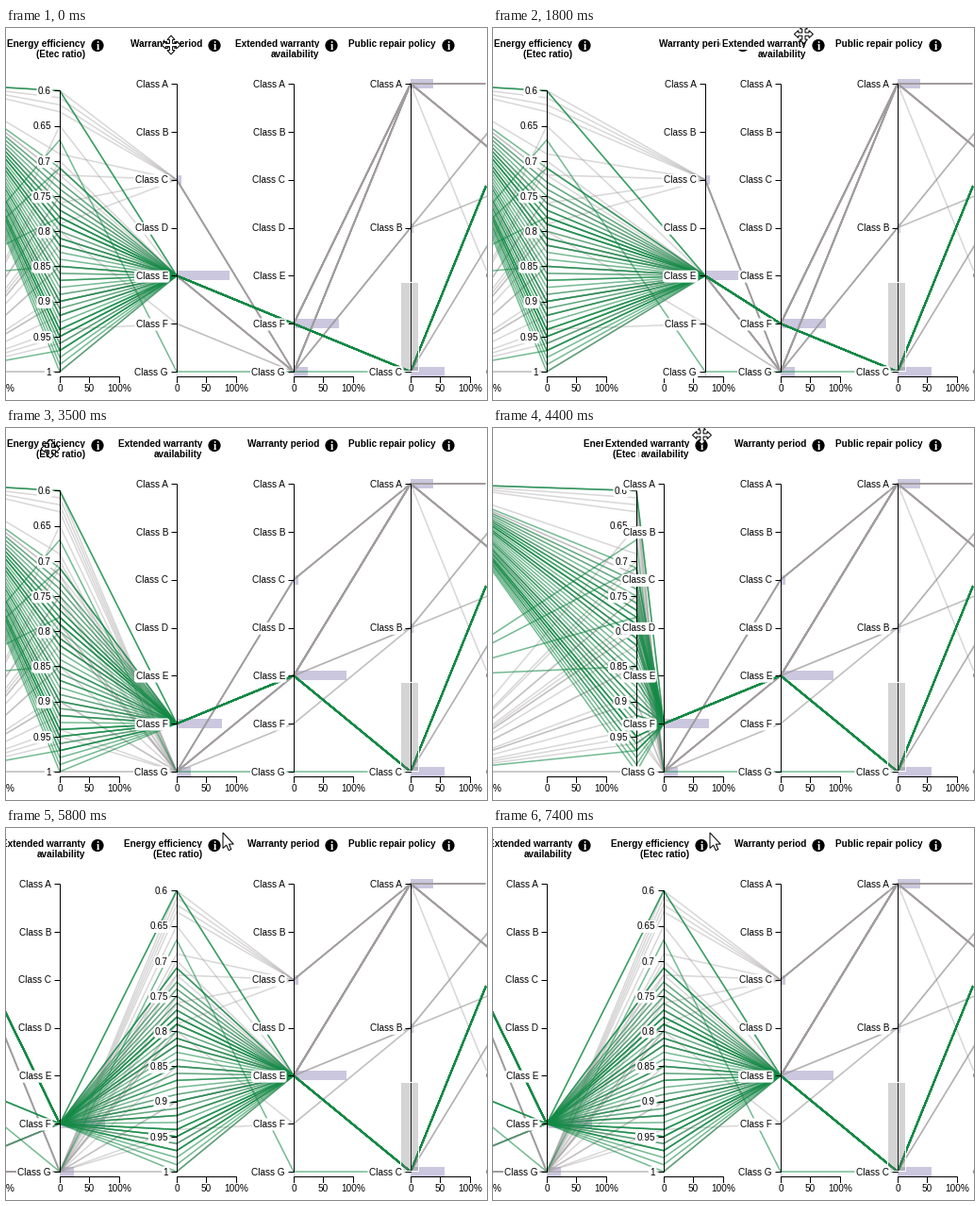
Animation of 510 by 394 pixels, one loop 7.5 s. Source, as a matplotlib script:

```python
import random

import matplotlib.pyplot as plt
import numpy as np
from matplotlib.animation import FuncAnimation
from matplotlib.collections import LineCollection
from matplotlib.patches import Circle, Polygon, Rectangle
from matplotlib.transforms import Affine2D

W, H, DPI = 510, 394, 64
PX = 72 / DPI
FRAMES, STEP = 75, 100
TOP, BOTTOM, BASE = 59, 364, 369
SLOTS = [-67 + 124 * i for i in range(6)]
GREEN, GRAY, BAR = (0.07, 0.54, 0.27), (0.63, 0.61, 0.62), (0.795, 0.78, 0.87)
LETTERS = "ABCDEFG"
CLASSES = dict(left=7, warranty=7, extended=7, repair=3, after=4)

plt.rcParams["font.family"] = "Liberation Sans"
plt.rcParams["font.size"] = 10 * PX

fig = plt.figure(figsize=(W / DPI, H / DPI), dpi=DPI, facecolor="white")
ax = fig.add_axes([0, 0, 1, 1])
ax.set_xlim(0, W)
ax.set_ylim(H, 0)
ax.axis("off")


def level(letter, count):
    return TOP + (BOTTOM - TOP) * LETTERS.index(letter) / (count - 1)


def ratio(v):
    return TOP + (BOTTOM - TOP) * (v - 0.59) / 0.41


def fan(path, low, high, count):
    """Records sharing one class path, spread evenly over the ratio axis."""
    shared = {d: level(c, n) for c, (d, n) in zip(path, CLASSES.items())}
    return [dict(shared, energy=ratio(round(v, 2)))
            for v in np.linspace(low, high, count)]


def scatter(path, low, high, count):
    return [r for _ in range(count) for r in fan(path, rng.uniform(low, high), high, 1)]


rng = random.Random(4)
gray = (fan("ACGAA", 0.6, 0.63, 4) + fan("ACGAB", 0.69, 0.79, 4)
        + fan("GEGAA", 0.65, 1, 8) + fan("GEGBA", 0.79, 1, 3)
        + fan("GEFAA", 0.71, 0.96, 8) + scatter("AEFAB", 0.7, 0.98, 10)
        + fan("AEFCB", 0.82, 0.9, 3) + fan("GFGBB", 0.8, 0.94, 2)
        + fan("AEFAD", 0.9, 0.9, 1))
green = (fan("AEFCA", 0.73, 1, 28) + scatter("AEFCA", 0.74, 0.99, 14)
         + fan("AEFCA", 0.6, 0.6, 2) + fan("AEFCA", 0.71, 0.71, 1)
         + fan("EEFCA", 0.71, 0.85, 3) + fan("GEFCA", 0.97, 0.97, 1)
         + fan("EGGCA", 0.67, 0.67, 1))
records = gray + green
threads = LineCollection(
    [], linewidths=1.55 * PX, zorder=1, snap=False,
    colors=[(*GRAY, 0.4)] * len(gray) + [(*GREEN, 0.58)] * len(green))
ax.add_collection(threads, autolim=False)


class Dimension:
    """A vertical axis with its title, ticks and bars, movable as one group."""

    def __init__(self, name, slot, ticks, *title):
        self.z = 10 + slot
        self.shift = Affine2D()
        self.tr = self.shift + ax.transData
        self.move(SLOTS[slot])
        if name in CLASSES:
            for y in ticks.values():
                share = np.mean([r[name] == y for r in records])
                self.add(Rectangle((0, y - 5), 63 * share, 10, fc=BAR, lw=0), 0.5)
        top, bottom = min(ticks.values()), max(ticks.values())
        paths = [[(0, top), (0, bottom)]]
        paths += [[(-6, y), (0, y)] for y in ticks.values()]
        lines = LineCollection(paths, colors="black", linewidths=PX,
                               transform=self.tr, zorder=self.z + 0.1)
        ax.add_collection(lines, autolim=False)
        for label, y in ticks.items():
            self.text(-9, y + 3.8, label)
        for i, line in enumerate(title):
            self.text(27, 19.5 + 11 * i, line, weight="bold")
        if title:
            self.add(Circle((40, 18.5), 6.6, fc="black", lw=0), self.z + 0.5)
            ax.text(40, 22.6, "i", ha="center", color="white", weight="bold",
                    family="Liberation Serif", size=12 * PX,
                    transform=self.tr, zorder=self.z + 0.6, clip_on=True)

    def add(self, patch, z):
        patch.set_transform(self.tr)
        patch.set_zorder(z)
        ax.add_artist(patch)

    def text(self, x, y, s, **style):
        halo = dict(boxstyle="round,pad=0.15,rounding_size=0.3", fc="white", lw=0)
        ax.text(x, y, s, ha="right", va="baseline", transform=self.tr,
                zorder=self.z + 0.4, bbox=halo, **style)

    def move(self, x):
        self.x = x
        self.shift.clear().translate(x, 0)


def class_ticks(name):
    n = CLASSES[name]
    return {f"Class {c}": level(c, n) for c in LETTERS[:n]}


def percent_scale(x):
    ax.plot([x, x, x + 63, x + 63], [BASE + 6, BASE, BASE, BASE + 6], "k", lw=PX, zorder=5)
    ax.plot([x + 31.4] * 2, [BASE, BASE + 6], "k", lw=PX, zorder=5)
    for part, label in ((0, "0"), (0.5, "50"), (1, "100%")):
        ax.text(x + 63 * part, BASE + 16.2, label, ha="center", va="baseline",
                zorder=5, clip_on=True)


for slot in SLOTS:
    percent_scale(slot)

ratios = {f"{v:g}": ratio(v) for v in np.round(np.arange(0.6, 1.01, 0.05), 2)}
dims = {
    "left": Dimension("left", 0, class_ticks("left")),
    "energy": Dimension("energy", 1, ratios, "Energy efficiency", "(Etec ratio)"),
    "warranty": Dimension("warranty", 2, class_ticks("warranty"), "Warranty period"),
    "extended": Dimension("extended", 3, class_ticks("extended"),
                          "Extended warranty", "availability"),
    "repair": Dimension("repair", 4, class_ticks("repair"), "Public repair policy"),
    "after": Dimension("after", 5, class_ticks("after")),
}
brush = dict(xy=(-11, 269), width=19, height=94)
dims["repair"].add(Rectangle(**brush, fc="#777777", alpha=0.31, lw=0), 14.2)
dims["repair"].add(Rectangle(**brush, fill=False, ec="white", lw=PX), 14.3)


def cursor(points):
    place = Affine2D()
    shape = Polygon(points, fc="white", ec="black", lw=PX, joinstyle="miter",
                    transform=place + ax.transData, zorder=30)
    ax.add_artist(shape)
    return shape, place


quarter = np.array([(-1.6, -1.6), (-1.6, -5.6), (-4, -5.6),
                    (0, -10), (4, -5.6), (1.6, -5.6)])
cross = np.vstack([Affine2D().rotate_deg(90 * k).transform(quarter) for k in range(4)])
arrow = [(-4, -9.5), (-4, 7), (-0.3, 3.6), (2.2, 9.2), (4.8, 8.1), (2.4, 2.6), (7.3, 2.6)]
hand, hand_place = cursor(cross)
pointer, pointer_place = cursor(arrow)


def glide(t, value, *moves):
    """Ease through moves given as (begin, end, goal)."""
    for begin, end, goal in moves:
        s = min(max((t - begin) / (end - begin), 0), 1)
        value += (goal - value) * s * s * (3 - 2 * s)
    return value


def draw(n):
    t = n * STEP / 1000
    # Each axis trails the hand that drags it, then settles into its slot.
    wx = glide(t, SLOTS[2], (0.9, 1.2, 177.5), (1.25, 2.8, 342), (2.8, 3.2, SLOTS[3]))
    ex = glide(t, SLOTS[1], (3.75, 4.95, 226), (5.0, 5.5, SLOTS[2]))
    x = glide(t, 175, (0.7, 1.9, 332.5), (2.6, 3.45, 47), (3.6, 4.55, 234))
    y = glide(t, 18, (0.7, 2.4, 2), (2.6, 3.45, 22), (3.6, 4.55, 6.5), (4.8, 5.1, 14.5))

    dims["warranty"].move(wx)
    dims["energy"].move(ex)
    # The neighbour jumps to the freed slot once it is passed.
    free = 3 if wx < SLOTS[3] else 2 if ex < SLOTS[2] else 1
    dims["extended"].move(SLOTS[free])

    order = sorted(dims, key=lambda name: dims[name].x)
    threads.set_segments([[(dims[d].x, r[d]) for d in order] for r in records])

    grabbing = t < 2.85 or 3.3 <= t < 4.95
    hand.set_visible(grabbing)
    pointer.set_visible(not grabbing)
    for place in (hand_place, pointer_place):
        place.clear().translate(x, y)
    return []


anim = FuncAnimation(fig, draw, frames=FRAMES, interval=STEP, repeat=True,
                     repeat_delay=0, blit=False, cache_frame_data=False)
plt.show()
```
